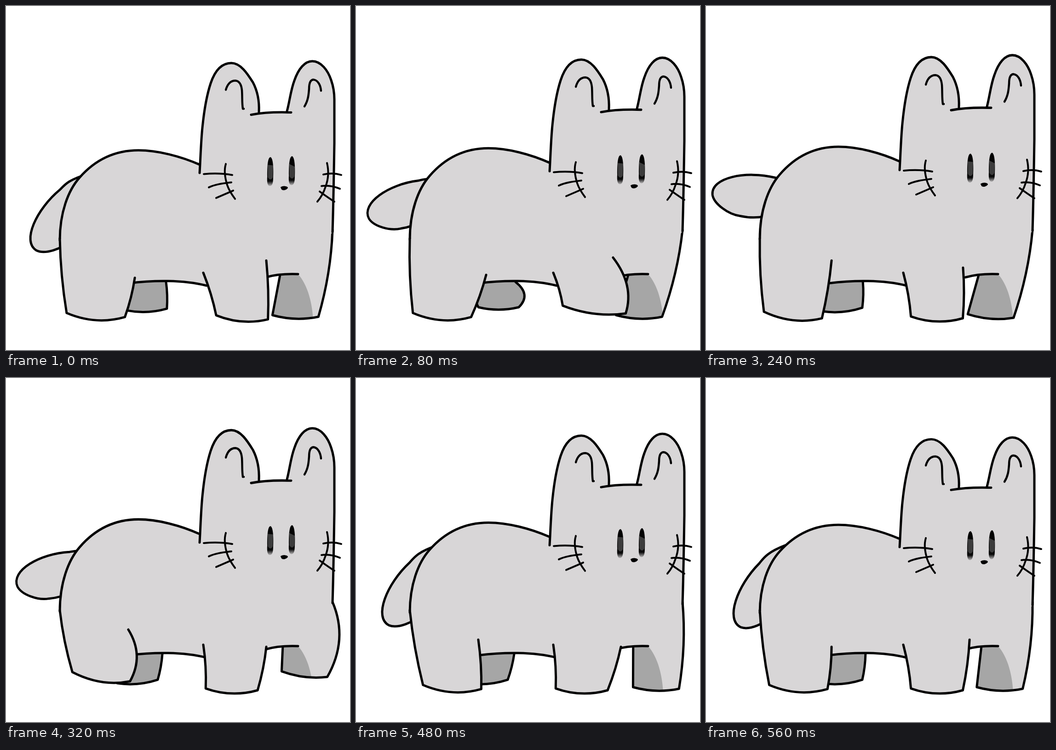
An HTML page with a canvas for the animation above (640 ms loop, 748 px wide and 748 px high).

```html
<!DOCTYPE html>
<html lang="en">
<head>
<meta charset="utf-8">
<title>Walking cat</title>
<style>
  html, body { margin: 0; width: 100%; height: 100%; overflow: hidden; background: #fff; }
  canvas { display: block; width: 100vw; height: 100vh; }
</style>
</head>
<body>
<canvas id="stage" width="748" height="748"></canvas>
<script>
const ctx = document.getElementById('stage').getContext('2d');
const STEP = 80, STEPS = 8;
const FUR = '#d8d6d7', SHADE = '#a6a6a6';
const BELLY_Y = 600;

// ---- Timing rules, all in steps of the walk cycle ----
const wrap = t => ((t % STEPS) + STEPS) % STEPS;
const wave = (t, peak) => Math.cos((t - peak) / STEPS * 2 * Math.PI);
const bump = (t, mid, reach) => Math.max(0, 1 - Math.abs(t - mid) / reach);

function ease(from, to, t) {
  const u = Math.min(1, Math.max(0, (t - from) / (to - from)));
  return (1 - Math.cos(u * Math.PI)) / 2;
}

// One bounce per cycle: 0 at step 7, 1 at the peak.
function bounce(t, peak) {
  const d = t - peak;
  return Math.cos(d / (d < 0 ? peak + 1 : 7 - peak) * Math.PI / 2);
}

// Foot flies forward from step 2 to 5, then drags back with a pause midway.
function stride(p) {
  if (p >= 2 && p <= 5) return (p - 3.5) / 1.5;
  const u = 1 - 2 * wrap(p - 5) / 5;
  return (u + u ** 3) / 2;
}

// ---- Fixed shapes ----
const EARS_AND_SIDES = {
  left: 'C423 330 424 295 427 266 C430 236 435 200 445 170 C455 140 470 126 490 126 C510 126 525 149 537 168 C547 187 551 210 550 232',
  right: 'C617 208 619 185 627 164 C636 138 650 122 666 122 C685 122 700 142 707 163 C713 180 714 195 714 205 L714 300 C713 360 712 430 710 492'
};
const { left, right } = EARS_AND_SIDES;
const back = 'C380 328 330 315 288 315 C230 315 190 340 160 374 C135 402 117 450 117 510';
const bodyFill = new Path2D(`M421 364 ${left} L550 236 Q580 232 611 232 ${right}
  L640 583 Q600 582 564 590 L436 608 C385 595 320 596 266 603 L117 510
  C117 450 135 402 160 374 C190 340 230 315 288 315 C330 315 380 328 421 346 Z`);
const outline = new Path2D(`M421 364 ${left} M533 238 C560 233 590 232 620 233 M611 230 ${right} M421 346 ${back}`);
const underside = new Path2D('M266 603 C320 596 385 595 436 608 M564 590 C585 584 610 582 635 583');
const innerEars = new Path2D(`M478 184 C482 170 490 164 499 164 C509 165 512 175 513 185 C514 200 513 213 515 225 L517 225
  M649 220 C657 207 658 195 659 182 C659 170 662 162 669 162 C678 163 684 174 685 186`);
const whiskers = new Path2D(`M478 345 C474 358 476 375 481 391 C485 403 492 413 498 421
  M430 367 C450 365 470 365 492 369 M441 396 C455 389 474 387 490 385 M457 419 L494 403
  M698 343 C702 360 701 378 695 394 C690 410 684 419 677 427
  M690 368 C703 365 716 365 729 369 M686 393 C700 391 714 394 726 399 M682 405 C692 412 703 420 714 427`);
const nose = new Path2D('M598 396 C603 393 611 394 612 397 C609 401 603 402 600 400 Z');
const shadeArea = new Path2D('M500 586 L635 583 C655 605 667 645 668 690 L500 700 Z');
const eye = new Path2D('M575 330 C581 332 582 355 581 375 C581 388 578 393 574 393 C569 393 567 386 568 372 C568 350 569 331 575 330 Z');
const tail = new Path2D('M215 405 C185 378 170 376 155 373 C90 352 12 362 13 400 C15 420 45 445 70 450 C90 456 108 457 124 455 L160 448');

// ---- Legs ----
// hip/knee: tops of the rear and front edges; foot: centre of the sole.
const farRear = t => ({
  phase: t + 3, hip: [240, 598], knee: [344 + 4 * wave(t, 0), 600],
  foot: [296 + 14 * wave(t, 1), 660], width: 88, lift: 10, tilt: -5, sag: 7, bow: 2
});
const farFront = t => ({
  phase: t, hip: [597 + 14 * stride(t), 587], knee: [710, 487],
  foot: [634 + 45 * stride(t), 674], width: 100, lift: 60, tilt: 2, sag: 8, bow: 8
});
const nearRear = t => ({
  phase: t, hip: [117, 505], knee: [273 + 10 * wave(t, 1), 569 + 22 * wave(t, 0)],
  foot: [198 + 27 * stride(t), 672], width: 127, lift: 45, tilt: 4, sag: 15, bow: 3, hipBow: -4
});
const nearFront = t => ({
  phase: t + 3, hip: [429, 580], knee: [566 + 10 * wave(t, 6), 569 + 22 * wave(t, 5)],
  foot: [502 + 16 * wave(t, 1), 677], width: 113, lift: 34, spread: 50, tilt: 2, sag: 12, bow: 3, hipBow: 3
});

function edge(path, a, b, dx, dy) {
  const at = u => [a[0] + (b[0] - a[0]) * u + dx, a[1] + (b[1] - a[1]) * u + dy];
  path.bezierCurveTo(...at(1 / 3), ...at(2 / 3), ...b);
}

function legPath({ phase, hip, knee, foot, width, lift, spread = 0, tilt, sag, bow, hipBow = 0 }) {
  const p = wrap(phase);
  const air = bump(p, 4.5, 1), bend = bump(p, 4, 1);
  const angle = (tilt + 5 * bump(p, 4, 2) - 21 * bump(p, 5, 1)) * Math.PI / 180;
  const half = (width + spread * air) / 2;
  const sole = side => [
    foot[0] + side * half * Math.cos(angle),
    foot[1] - lift * air + side * half * Math.sin(angle)
  ];
  const heel = sole(-1), toe = sole(1);
  const path = new Path2D();
  path.moveTo(...hip);
  edge(path, hip, heel, hipBow, 0);
  edge(path, heel, toe, 0, sag);
  edge(path, toe, knee, bow + 19 * bend, 0);
  return path;
}

// ---- Drawing ----
function ink(path, width = 5) {
  ctx.lineWidth = width;
  ctx.stroke(path);
}

function fill(path, color) {
  ctx.fillStyle = color;
  ctx.fill(path);
}

function part(path, color) {
  fill(path, color);
  ink(path);
}

function within(setup, paint) {
  ctx.save();
  setup();
  paint();
  ctx.restore();
}

function drawTail(t) {
  const u = t < 2.3 ? t + STEPS : t;
  const droop = ease(2.3, 6.5, u) - ease(7.5, 10.2, u);
  within(() => {
    ctx.translate(160, 420);
    ctx.rotate(-63 * droop * Math.PI / 180);
    ctx.scale(1 - 0.07 * Math.sin(Math.PI * droop), 1);
    ctx.translate(-160, -420);
  }, () => part(tail, FUR));
}

function drawFarFront(t) {
  const leg = legPath(farFront(t));
  fill(leg, FUR);
  within(() => ctx.clip(shadeArea), () => fill(leg, SHADE));
  ink(leg);
}

function drawEye(dx, dy, slant) {
  within(() => ctx.translate(dx, dy), () => {
    const fade = ctx.createLinearGradient(0, 330, 0, 394);
    fade.addColorStop(0, '#000');
    fade.addColorStop(0.82, '#0a0a0a');
    fade.addColorStop(1, 'rgba(20,20,20,.1)');
    fill(eye, fade);
    fill(new Path2D(`M569 347 L581 ${347 + slant} L580 374 Q575 383 569.5 374 Z`), '#3c3c3c');
  });
}

function draw(t) {
  ctx.fillStyle = '#fff';
  ctx.fillRect(0, 0, 748, 748);
  ctx.strokeStyle = '#000';
  ctx.lineCap = ctx.lineJoin = 'round';

  const s = 0.985 + 0.0468 * bounce(t, 2.7);
  const stretch = () => {
    ctx.translate(0, BELLY_Y * (1 - s));
    ctx.scale(1, s);
  };

  drawTail(t);
  part(legPath(farRear(t)), SHADE);
  drawFarFront(t);
  within(stretch, () => {
    fill(bodyFill, FUR);
    ink(outline);
    ink(innerEars, 4.5);
  });
  ink(underside);
  part(legPath(nearRear(t)), FUR);
  part(legPath(nearFront(t)), FUR);
  within(() => ctx.translate(0, 3 - 12 * bounce(t, 3)), () => {
    ink(whiskers, 4);
    drawEye(0, 0, 1);
    drawEye(47, -2, 6);
    fill(nose, '#000');
    ink(nose, 2);
  });
}

const start = performance.now();
function tick() {
  draw(Math.floor((performance.now() - start) / STEP) % STEPS);
  requestAnimationFrame(tick);
}
tick();
</script>
</body>
</html>
```
